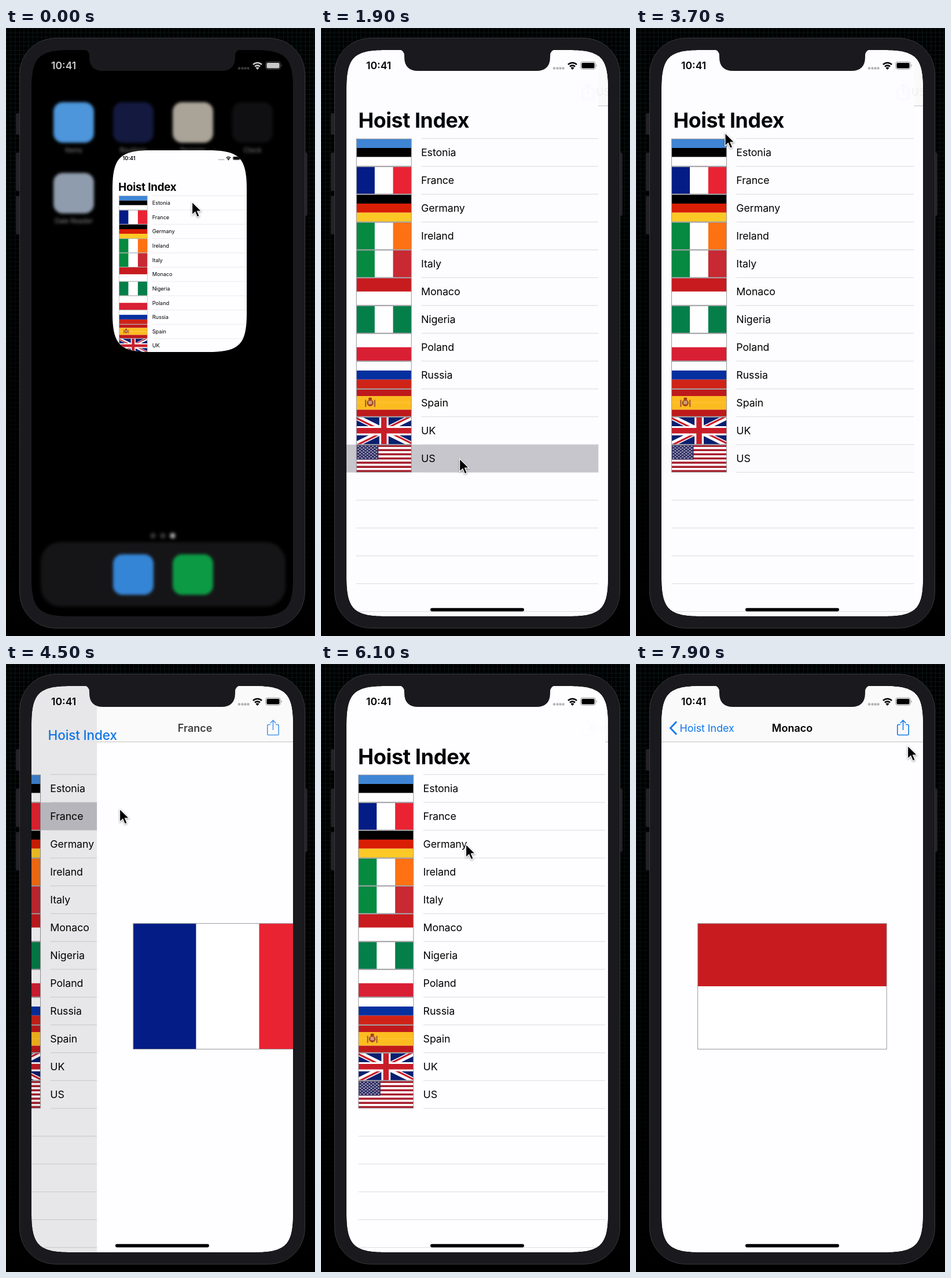
Write an HTML page that moves like this. It is 534 by 1049 pixels and loops after 8 s.

```html
<!DOCTYPE html>
<html lang="en">
<head>
<meta charset="utf-8">
<title>Flags</title>
<style>
  html, body { margin: 0; width: 100%; height: 100%; overflow: hidden; background: #000; }
  svg { display: block; }
  text { font-family: Inter, Roboto, sans-serif; }
  #home { filter: blur(2.6px); }
  .row { font-size: 17.8px; letter-spacing: -.1px; }
  .label { font-size: 11.5px; fill: #858585; text-anchor: middle; }
</style>
</head>
<body>
<svg id="stage" width="534" height="1049" viewBox="0 0 534 1049">
  <defs>
    <pattern id="grid" width="7.6" height="7.6" patternUnits="userSpaceOnUse">
      <path d="M0 .5H7.6M.5 0V7.6" stroke="#0a1718" fill="none"/>
    </pattern>
    <linearGradient id="fade" x2="0" y2="1">
      <stop offset="0" stop-opacity="0"/><stop offset=".75" stop-opacity=".7"/><stop offset="1"/>
    </linearGradient>
    <polygon id="star" fill="#fff"/>
    <g id="status">
      <text x="78" y="71" font-size="17.6" font-weight="600">10:41</text>
      <g opacity=".29"><circle cx="403" cy="69.5" r="2.2"/><circle cx="408.5" cy="69.5" r="2.2"/><circle cx="413.5" cy="69.5" r="2.2"/><circle cx="418.5" cy="69.5" r="2.2"/></g>
      <path d="M427 63.2a10.4 10.4 0 0 1 15 0M430 66.6a6.2 6.2 0 0 1 9 0" fill="none" stroke="currentColor" stroke-width="2.6"/>
      <path d="M434.5 72l-3-3.2a4.2 4.2 0 0 1 6 0z"/>
      <rect x="448.7" y="58.2" width="25.6" height="13" rx="3.8" fill="none" stroke="currentColor" opacity=".4"/>
      <rect x="450.4" y="59.9" width="22.2" height="9.6" rx="2.2"/>
      <path d="M475.7 62.5q2 2.2 0 4.6z" opacity=".45"/>
    </g>
    <clipPath id="screenClip"><path id="screen"/></clipPath>
    <clipPath id="cardClip"><path id="card"/></clipPath>
  </defs>

  <rect width="534" height="1049" fill="#000"/>
  <rect width="534" height="1049" fill="url(#grid)"/>
  <rect width="534" height="1049" fill="url(#fade)"/>
  <g fill="#232226">
    <rect x="17" y="147" width="8" height="37" rx="2"/>
    <rect x="17" y="215" width="8" height="66" rx="2"/>
    <rect x="17" y="290" width="8" height="66" rx="2"/>
    <rect x="514" y="215" width="7" height="109" rx="2"/>
  </g>
  <rect x="23.5" y="17.5" width="493" height="1018" rx="62" fill="#1a191d" stroke="#38373a"/>

  <g clip-path="url(#screenClip)">
    <rect x="44" y="38" width="452" height="977"/>
    <g id="homeLayer">
      <g id="home"></g>
      <use href="#status" fill="#c9c9c9" color="#c9c9c9"/>
    </g>
    <g clip-path="url(#cardClip)">
      <g id="app">
        <rect x="44" y="38" width="452" height="977" fill="#fefdff"/>
        <g id="list"></g>
        <rect id="dim" x="44" y="38" width="452" height="977"/>
        <g id="panel">
          <rect x="44" y="38" width="452" height="977" fill="#fefdff"/>
          <rect x="44" y="38" width="452" height="96" fill="#fafafb"/>
          <path d="M44 134.3H496" stroke="#bfbec2"/>
          <g id="details"></g>
        </g>
        <text id="heading" y="116.5" font-size="18" font-weight="600" text-anchor="middle"></text>
        <path id="share" d="M457 104.5h-3.2q-2 0-2 2v14q0 2 2 2h15.4q2 0 2-2v-14q0-2-2-2H466M461.5 114V97.5M456.7 102l4.8-4.8 4.8 4.8" fill="none" stroke="#1279ea" stroke-width="1.6"/>
        <path id="chevron" d="M70 99.5L59.5 110.5 70 121.5" fill="none" stroke="#0f78eb" stroke-width="2.8"/>
        <text id="title">Hoist Index</text>
        <use href="#status"/>
        <rect x="189" y="1000.8" width="162" height="5.6" rx="2.8"/>
      </g>
    </g>
  </g>
  <path d="M134 37q10 1 10 11v2q0 24 24 24h204q24 0 24-24v-2q0-10 10-11z" fill="#1a191d"/>
  <path id="cursor" d="M0 0V22.5L5.3 17.6 9 26.2 12.8 24.5 9.2 16.1H16.3Z" stroke="#fff" stroke-width="1.3" style="filter:drop-shadow(0 1.5px 1.5px #0006)"/>
</svg>

<script>
const $ = id => document.getElementById(id);
const put = (id, attrs) => { for (const k in attrs) $(id).setAttribute(k, attrs[k]); };
const mix = (a, b, p) => a + (b - a) * p;
const range = n => [...Array(n).keys()];
const clamp = v => Math.max(0, Math.min(1, v));

// Rounded box whose corners ease into the sides.
function squircle(x, y, w, h, r) {
  const e = 1.5 * r, k = e - .28 * r;
  return `M${x + e} ${y}h${w - 2 * e}c${k} 0 ${e} ${e - k} ${e} ${e}v${h - 2 * e}c0 ${k} ${k - e} ${e} ${-e} ${e}`
    + `h${2 * e - w}c${-k} 0 ${-e} ${k - e} ${-e} ${-e}v${2 * e - h}c0 ${-k} ${e - k} ${-e} ${e} ${-e}z`;
}

// Flags share a 60 x 40 box and are stretched to the size they are shown at.
const rect = (x, y, w, h, fill) => `<rect x="${x}" y="${y}" width="${w}" height="${h}" fill="${fill}"/>`;
const bars = (...c) => c.map((f, i) => rect(0, i * 40 / c.length, 60, 40 / c.length, f)).join('');
const columns = (...c) => c.map((f, i) => rect(i * 20, 0, 20, 40, f)).join('');
const line = (d, color, width) => `<path d="${d}" stroke="${color}" stroke-width="${width}" fill="none"/>`;

function usFlag() {
  const stripes = bars(...range(13).map(i => i % 2 ? '#fff' : '#a81d2c'));
  const stars = range(9).map(r => range(6 - r % 2).map(c =>
    `<use href="#star" x="${1.95 + c * 4 + r % 2 * 2}" y="${2.15 + r * 2.16}"/>`).join('')).join('');
  return stripes + rect(0, 0, 24, 280 / 13, '#363468') + stars;
}

// Drawn at its own 60 x 30 proportions.
function ukFlag() {
  const cross = 'M30 0V30M0 15H60';
  return '<g transform="scale(1 1.3333)">' + rect(0, 0, 60, 30, '#0a1f70')
    + line('M0 0L60 30M60 0L0 30', '#fff', 6)
    + line('M-.45 .9L29.55 15.9M59.55 -.9L29.55 14.1M60.45 29.1L30.45 14.1M.45 30.9L30.45 15.9', '#c81d29', 2)
    + line(cross, '#fff', 10) + line(cross, '#c81d29', 6) + '</g>';
}

function spainFlag() {
  const crest = `<ellipse cx="15" cy="20" rx="3.6" ry="5" fill="#a8421f"/><circle cx="15" cy="14" r="1.9" fill="#a3391c"/>
    <path d="M10 15.5V26M20 15.5V26" stroke="#a65a35" stroke-width="1.4"/>
    <rect x="13" y="17" width="4" height="5" fill="#cfa07a"/>`;
  return bars('#bf1a1b', '#fdbd20', '#fdbd20', '#bf1a1b') + crest;
}

const flags = {
  Estonia: bars('#3f86d6', '#000', '#fff'),
  France: columns('#041c86', '#fff', '#ea2333'),
  Germany: bars('#000', '#d91e05', '#fdc926'),
  Ireland: columns('#068a40', '#fff', '#ff7113'),
  Italy: columns('#068a40', '#fff', '#c92932'),
  Monaco: bars('#c81b1f', '#fff'),
  Nigeria: columns('#047f4a', '#fff', '#047f4a'),
  Poland: bars('#fff', '#d91f34'),
  Russia: bars('#fff', '#0530a0', '#d02318'),
  Spain: spainFlag(),
  UK: ukFlag(),
  US: usFlag()
};
const names = Object.keys(flags);
const rowTop = i => 190.8 + 48 * i;

const flagBox = (name, x, y, w, h) =>
  `<svg x="${x}" y="${y}" width="${w}" height="${h}" viewBox="0 0 60 40" preserveAspectRatio="none">${flags[name]}</svg>
   <rect x="${x}" y="${y}" width="${w}" height="${h}" fill="none" stroke="#98979b"/>`;

put('star', { points: range(10).map(i => {
  const r = i % 2 ? .44 : 1.1, a = i * Math.PI / 5;
  return `${r * Math.sin(a)},${-r * Math.cos(a)}`;
}).join(' ') });
put('screen', { d: squircle(44, 38, 452, 977, 45) });

$('list').innerHTML = '<rect id="selected" x="44" width="452" height="48" fill="#c8c7cd"/>'
  + range(18).map(i => line(`M${i < 13 ? 178.3 : 66} ${rowTop(i)}H496`, '#dad9dd', 1.1)).join('')
  + names.map((n, i) => flagBox(n, 66.2, rowTop(i) + .5, 95, 47)
    + `<text class="row" x="178" y="${rowTop(i) + 30.6}">${n}</text>`).join('');

const icon = (x, y, fill, label) => `<rect x="${x}" y="${y}" width="70" height="70" rx="16" fill="${fill}"/>`
  + (label ? `<text class="label" x="${x + 35}" y="${y + 87}">${label}</text>` : '');
$('home').innerHTML = icon(82, 128, '#4d96db', 'Items') + icon(185, 128, '#14193f', 'Routines')
  + icon(288, 128, '#aaa398', 'Persons') + icon(391, 128, '#101012', 'Clock')
  + icon(82, 250, '#8f9cad', 'Gale Reader')
  + '<rect x="60" y="887" width="423" height="111" rx="34" fill="#151517"/>'
  + icon(185, 908, '#3585d6') + icon(288, 908, '#0c9a45')
  + [254, 271, 288].map((x, i) => `<circle cx="${x}" cy="876" r="5" fill="${i < 2 ? '#333' : '#999'}"/>`).join('');

const trips = [
  { name: 'US', push: 1877, pop: 3300 },
  { name: 'France', push: 4293, pop: 5592 },
  { name: 'Monaco', push: 6650, pop: 1e6 }
];
$('details').innerHTML = trips.map(({ name }) =>
  `<g id="detail${name}">${flagBox(name, 106.7, 447.7, 326.5, 216.8)}</g>`).join('');

const spring = ms => {
  const x = Math.max(0, ms) * .013;
  return 1 - (1 + x) * Math.exp(-x);
};

// Cursor stops: time, x, y
const stops = [
  [500, 321.5, 300], [1500, 239.5, 743], [2250, 239.5, 743], [2950, 115.5, 119], [3420, 115.5, 119],
  [4000, 196.5, 250], [4650, 196.5, 250], [5250, 114, 114], [5600, 114, 114],
  [6120, 251, 312], [6480, 258, 446], [7000, 258, 446], [7750, 469.5, 141]
];
function cursorAt(t) {
  const i = stops.findIndex(s => s[0] > t);
  if (i === 0) return stops[0].slice(1);
  if (i < 0) return stops[stops.length - 1].slice(1);
  const [a, b] = [stops[i - 1], stops[i]];
  const u = (t - a[0]) / (b[0] - a[0]), e = u * u * (3 - 2 * u);
  return [mix(a[1], b[1], e), mix(a[2], b[2], e)];
}

function drawLaunch(t) {
  const rest = Math.exp(-.0112 * t), drop = Math.exp(-.0102 * t);
  const x = mix(44, 184, rest), y = mix(38, 211, drop);
  const w = mix(452, 232, rest), h = mix(977, 348, drop);
  const scale = w / 452;
  put('card', { d: squircle(x, y, w, h, 45) });
  put('app', { transform: `translate(${x - 44 * scale} ${y - 38 * scale}) scale(${scale})` });
  put('homeLayer', { opacity: clamp((rest - .04) / .96) });
}

function drawTrip(t) {
  const trip = trips.filter(s => t >= s.push - 110).pop() || trips[0];
  const open = spring(t - trip.push) - spring(t - trip.pop);
  const pressed = t > trip.pop - 200 && t < trip.pop + 40;

  put('list', { transform: `translate(${-135.6 * open})` });
  put('panel', { transform: `translate(${452 * (1 - open)})` });
  put('dim', { opacity: .12 * open });
  put('selected', {
    y: rowTop(names.indexOf(trip.name)),
    opacity: t < trip.push - 110 ? 0 : t < trip.pop ? 1 : open
  });
  for (const { name } of trips) put('detail' + name, { display: name === trip.name ? 'inline' : 'none' });

  $('heading').textContent = trip.name;
  put('heading', { x: 270 + 226 * (1 - open), opacity: open });
  put('share', { opacity: open });
  const fade = pressed ? .3 : 1;
  put('chevron', { opacity: clamp((open - .8) * 5) * fade });
  const tint = clamp(open * 1.3);
  put('title', {
    x: mix(64, 75.5, open), y: mix(174, 116.7, open),
    'font-size': mix(36.4, 17.9, open),
    'letter-spacing': mix(-.4, -.05, open),
    'font-weight': Math.round(7 - 3 * open) * 100,
    fill: `rgb(${15 * tint},${120 * tint},${235 * tint})`,
    opacity: fade
  });
}

function draw(t) {
  drawLaunch(t);
  drawTrip(t);
  put('cursor', { transform: `translate(${cursorAt(t)})` });
}

const STEP = 100, LOOP = 8000;
const start = performance.now();
function tick() {
  const t = Math.max(0, performance.now() - start) % LOOP;
  draw(Math.floor(t / STEP + .05) * STEP % LOOP);
  requestAnimationFrame(tick);
}
tick();
</script>
</body>
</html>
```
